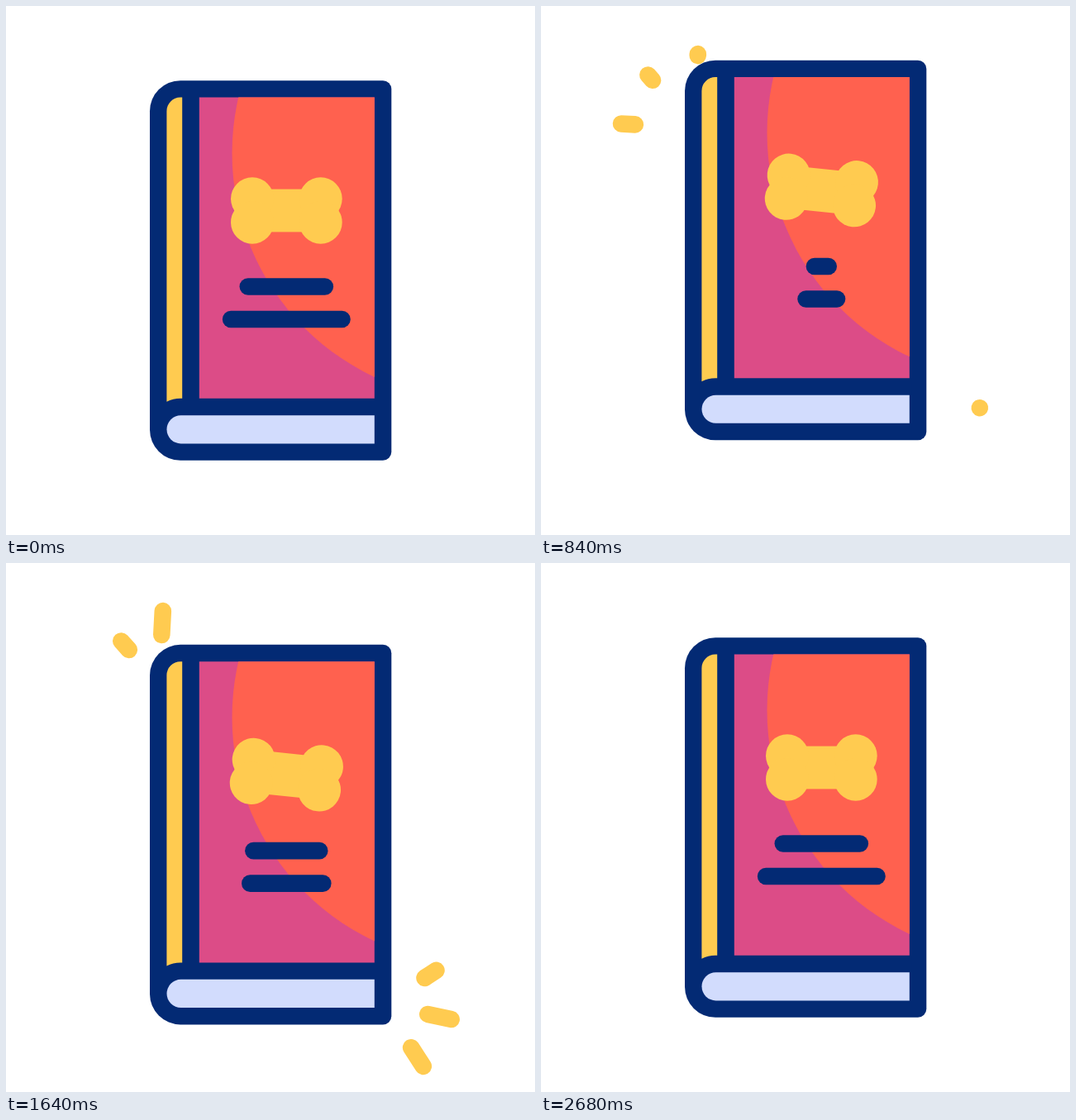
An HTML page for the animation above (3000 ms loop, 640 by 640 pixels).

```html
<!DOCTYPE html>
<html lang="en">
<head>
<meta charset="utf-8">
<title>Bouncing book</title>
<style>
  html, body { margin: 0; width: 100%; height: 100%; overflow: hidden; background: #fff; }
  svg { display: block; width: 100vw; height: 100vh; }
  line { stroke-width: 20.6; stroke-linecap: round; }
  .navy { fill: #032a74; }
  .gold { fill: #ffcb50; }
  #titles { stroke: #032a74; }
  #sparks { stroke: #ffcb50; }
</style>
</head>
<body>
<svg viewBox="0 0 640 640">
  <clipPath id="cover"><rect x="233.8" y="110.6" width="212" height="364.2"/></clipPath>
  <g id="sparks"></g>
  <g id="book">
    <path class="navy" d="M211 90.2H456a10.3 10.3 0 0 1 10.3 10.3V539.5a10.3 10.3 0 0 1-10.3 10.3H211a37 37 0 0 1-37-37V127.2a37 37 0 0 1 37-37z"/>
    <path class="gold" d="M213.2 110.6H211a16.6 16.6 0 0 0-16.6 16.6V478.8Q202 474.8 211 474.8h2.2z"/>
    <g clip-path="url(#cover)">
      <rect x="233" y="110" width="214" height="366" fill="#dc4c87"/>
      <circle cx="572.5" cy="178" r="299" fill="#ff614f"/>
    </g>
    <path fill="#d2dcfd" d="M445.8 495.2H211.6a17.1 17.1 0 0 0 0 34.2H445.8z"/>
    <g id="bone" class="gold">
      <rect x="298" y="221.6" width="83" height="51.8"/>
      <circle cx="298" cy="233.3" r="26"/>
      <circle cx="380.7" cy="233.3" r="26"/>
      <circle cx="298" cy="261.7" r="26"/>
      <circle cx="380.7" cy="261.7" r="26"/>
    </g>
    <g id="titles"></g>
  </g>
</svg>
<script>
const LOOP = 3000;
const CENTER = 339.3;
const $ = id => document.getElementById(id);

// Turning points of the fading bounce: [time, offset].
const bounce = [[0, 0], [430, 35.7], [905, -27.7], [1450, 18.8], [1956, -13], [2447, 0]];

const titles = [
  { y: 339.5, full: 46.5, small: 8.4, delay: 300 },
  { y: 379, full: 67.2, small: 18.4, delay: 183 }
];

// Each fan turns 45 degrees from one spark to the next.
const fans = [
  { roots: [[489, 584.5], [510.3, 546], [506.5, 502]], angle: 57, delay: 0 },
  { roots: [[188.3, 87], [148.8, 105], [126, 144]], angle: -87, delay: 128 }
];

function ease(x) {
  x = Math.min(1, Math.max(0, x));
  return x * x * (3 - 2 * x);
}

// Time since the start of the current run; everything runs twice.
function runTime(t, start, period) {
  return t - start - (t >= start + period ? period : 0);
}

function bookY(t) {
  return bounce.slice(1).reduce((y, [end, to], i) => {
    const [start, from] = bounce[i];
    return y + (to - from) * ease((t - start) / (end - start));
  }, 0);
}

function boneAngle(t) {
  const p = runTime(t, 367, 1067);
  return 5.9 * (ease(p / 200) - ease((p - 481) / 533));
}

function addLine(parent) {
  return parent.appendChild(document.createElementNS("http://www.w3.org/2000/svg", "line"));
}

function setLine(el, [x1, y1], [x2, y2]) {
  Object.entries({ x1, y1, x2, y2 }).forEach(([k, v]) => el.setAttribute(k, v));
}

function drawTitle({ el, y, full, small, delay }, t) {
  const p = runTime(t, delay, 1200);
  const open = 1 - ease(p / 533) + ease((p - 633) / 533);
  const half = small + (full - small) * open;
  setLine(el, [CENTER - half, y], [CENTER + half, y]);
}

// A spark grows outwards from its root, then is erased the same way.
function drawSpark({ el, root, angle, grow, erase }, t) {
  const p = runTime(t, grow, 1090);
  const head = ease(p / 140);
  const tail = ease((p - erase + grow) / 240);
  el.style.display = head > 0 && tail < 1 ? "" : "none";
  const a = angle * Math.PI / 180;
  const at = f => [root[0] + 29 * f * Math.cos(a), root[1] + 29 * f * Math.sin(a)];
  setLine(el, at(tail), at(head));
}

titles.forEach(o => o.el = addLine($("titles")));

const sparks = fans.flatMap(({ roots, angle, delay }) => roots.map((root, i) => ({
  root,
  angle: angle - 45 * i,
  grow: 234 + delay + 120 * i,
  erase: 512 + delay + 47 * i,
  el: addLine($("sparks"))
})));

function draw(t) {
  $("book").setAttribute("transform", `translate(0 ${bookY(t)})`);
  $("bone").setAttribute("transform", `rotate(${boneAngle(t)} ${CENTER} 247.5)`);
  titles.forEach(o => drawTitle(o, t));
  sparks.forEach(o => drawSpark(o, t));
}

const begin = performance.now();
function tick() {
  draw((performance.now() - begin) % LOOP);
  requestAnimationFrame(tick);
}
tick();
</script>
</body>
</html>
```
